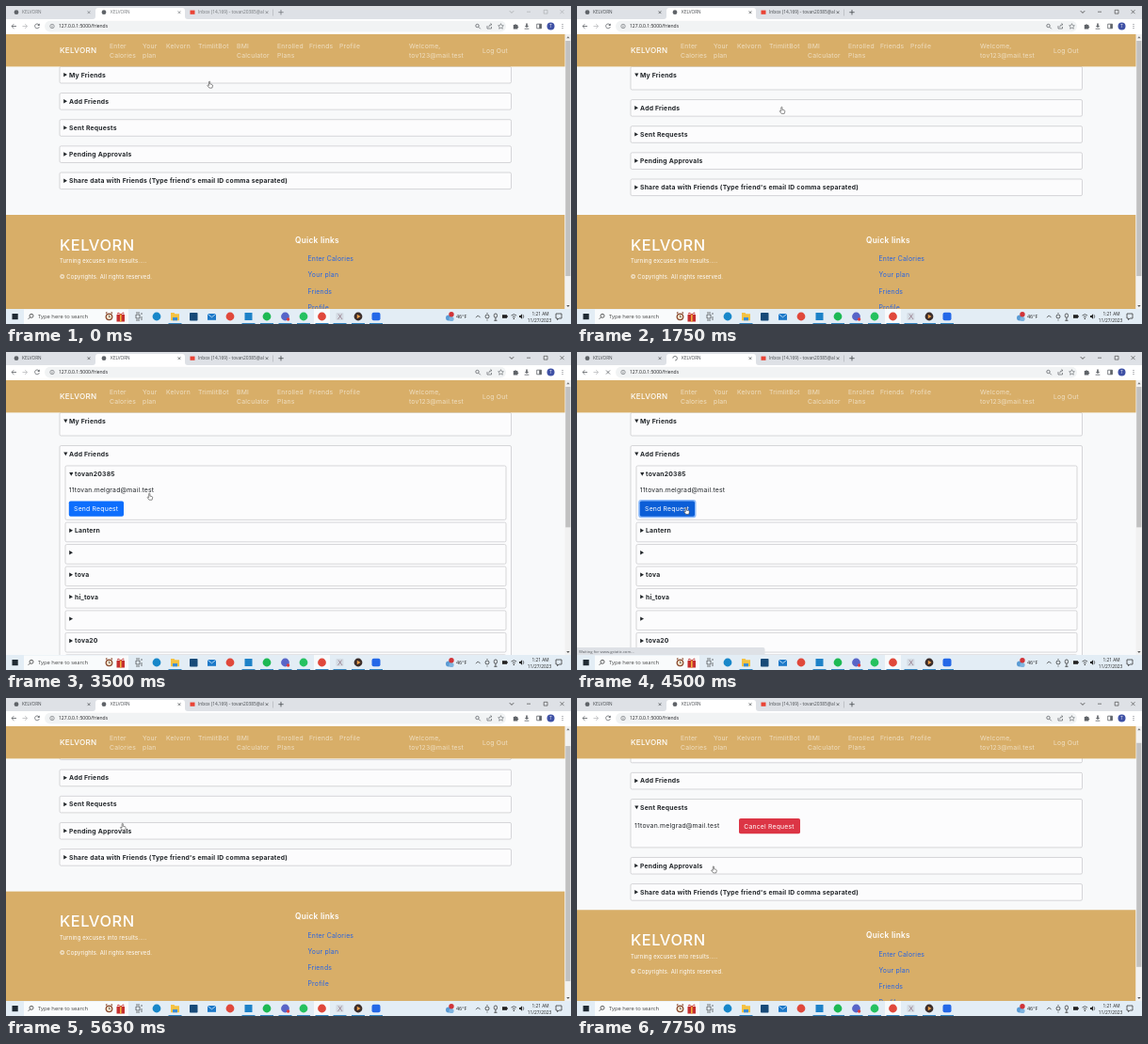
Animation, 600 px wide and 338 px high, one loop 8 s. Source, as an HTML page:

```html
<!DOCTYPE html>
<html lang="en">
<head>
<meta charset="utf-8">
<title>Friends page</title>
<style>
  html, body { margin: 0; width: 100%; height: 100%; overflow: hidden; }
  svg { display: block; width: 600px; height: 338px; }
  text { font-family: "Open Sans", sans-serif; white-space: pre; }
  .web { font-family: Inter, sans-serif; letter-spacing: .032em; }
</style>
</head>
<body>
<svg id="stage" viewBox="0 0 600 338">
  <g id="page"></g>
  <g id="frame"></g>
  <g id="overlay"></g>
  <path id="cursor" fill="#fff" stroke="#333" stroke-width=".55" stroke-linejoin="round"
    d="M-1.2-3.3q.6-.8 1.2 0v2.6l2.2.5q.8.4.6 1.3l-.6 2.3h-3l-2.1-2.7q.2-.8 1.7.1z"/>
</svg>
<script>
const TAN = '#d8ae68', LOOP = 8000, STEP = 125;
const ROW = 17.6, GAP = 10.55, TOP = 64.4;
const BRAND = 'KELVORN', EMAIL = '11tovan.melgrad@mail.test';
const USERS = ['tovan20385', 'Lantern', '', 'tova', 'hi_tova', '', 'tova20', 'tov'];
const $ = id => document.getElementById(id);

// Drawing helpers; text is placed by the middle of its capitals.
const text = (x, mid, str, size, fill, attrs = '') =>
  `<text x="${x}" y="${mid + size * .36}" font-size="${size}" fill="${fill}" ${attrs}>${str}</text>`;
const web = (x, mid, str, fill = '#212529', size = 6.8, weight = 400) =>
  text(x, mid, str, size, fill, `class="web" font-weight="${weight}"`);
const rect = (x, y, w, h, fill, attrs = '') =>
  `<rect x="${x}" y="${y}" width="${w}" height="${h}" fill="${fill}" ${attrs}/>`;
const disc = (x, y, r, fill, attrs = '') =>
  `<circle cx="${x}" cy="${y}" r="${r}" fill="${fill}" ${attrs}/>`;
const ring = (x, y, r, color, w = .8) => disc(x, y, r, 'none', `stroke="${color}" stroke-width="${w}"`);
const line = (d, color = '#5f6368', w = .8) =>
  `<path d="${d}" fill="none" stroke="${color}" stroke-width="${w}"/>`;
const shape = (d, fill) => `<path d="${d}" fill="${fill}"/>`;
const cross = (x, y, r, color, w = .7) =>
  line(`M${x - r} ${y - r}l${2 * r} ${2 * r}m0 ${-2 * r}l${-2 * r} ${2 * r}`, color, w);

// The window's title strip is paler while the window has no focus.
function drawTabs(focused, loading) {
  const ink = focused ? '#45494d' : '#73777b', controls = focused ? '#333' : '#a3a6a9';
  let s = rect(0, 0, 600, 14, '#dee1e6') +
    shape('M92 14q3 0 3-3v-6q0-3 3-3h89q3 0 3 3v6q0 3 3 3z', '#fff');
  s += disc(11, 6.7, 2.4, '#5f6368') + (loading
    ? line('M101.8 6.7a2.3 2.3 0 1 1 2.3 2.3', '#5f6368', .8)
    : disc(104, 6.7, 2.4, '#5f6368'));
  s += text(17, 6.7, BRAND, 4.7, ink) + text(111, 6.7, BRAND, 4.7, ink);
  s += rect(195.5, 4.6, 5, 4.2, '#ea4335') +
    text(204, 6.7, 'Inbox (14,169) - tovan20385@al', 4.8, ink, 'clip-path="url(#tab)"') +
    '<clipPath id="tab"><path d="M204 0h70v14h-70z"/></clipPath>';
  for (const x of [88, 184, 277]) s += cross(x, 6.7, 1.4, ink);
  s += line('M283.5 3.5v7', '#a0a5aa', .5) + line('M289.3 6.7h5.4m-2.7-2.7v5.4', ink);
  s += line('M534.8 5.2l2.2 2.2l2.2-2.2', controls) + line('M553 6.2h4', controls, .6) +
    line('M571.2 4.3h3.8v3.8h-3.8z', controls, .6) + cross(590.5, 6.2, 2, controls, .6);
  return s;
}

function drawToolbar() {
  let s = rect(0, 14, 600, 16, '#fff') + rect(41, 15.8, 490, 11.6, '#f1f3f4', 'rx="5.8"');
  s += line('M11 21.5h-5m2.4-2.4l-2.4 2.4l2.4 2.4') +
    line('M17.5 21.5h5m-2.4-2.4l2.4 2.4l-2.4 2.4', '#babcbe');
  s += ring(49, 21.5, 2.2, '#5f6368', .6) + line('M49 21v1.8m0-2.8v.5', '#5f6368', .6) +
    text(56, 21.5, '127.0.0.1:5000/friends', 5, '#202124');
  s += ring(500.5, 21, 1.7, '#5f6368') + line('M501.8 22.3l2 2');
  s += line('M511 21v3h4.5v-2m-2.8 .6q0-3 3-3m-1.2-1.2l1.4 1.2l-1.4 1.2', '#5f6368', .7);
  s += line('M525.5 18.7l.9 1.9l2 .2l-1.5 1.4l.4 2l-1.8-1l-1.8 1l.4-2l-1.5-1.4l2-.2z', '#5f6368', .6);
  s += shape('M538.8 20h1.5q.7-2 1.5 0h1.6v1.6q2 .8 0 1.6v1.4h-4.6z', '#5f6368');
  s += shape('M552.2 18.5h1.6v2.4h1.4l-2.2 2.2l-2.2-2.2h1.4z', '#5f6368') + line('M550.6 24.2h4.8');
  s += line('M563.7 19.2h4.8v4.6h-4.8z') + rect(566.2, 19.2, 2.3, 4.6, '#5f6368');
  s += disc(578.5, 21.5, 4, '#3f51a5') + text(578.5, 21.5, 'T', 4.4, '#fff', 'text-anchor="middle"');
  for (const dy of [-2, 0, 2]) s += disc(591, 21.5 + dy, .55, '#5f6368');
  return s;
}

function drawNav() {
  const faint = '#efdfc3';
  const links = [[110, 'Enter', 'Calories'], [145, 'Your', 'plan'], [170, 'Kelvorn'], [204, 'TrimlitBot'],
    [245, 'BMI', 'Calculator'], [288, 'Enrolled', 'Plans'], [322, 'Friends'], [354, 'Profile'],
    [428, 'Welcome,', 'tov123@mail.test']];
  let s = rect(0, 30, 593.5, 34.4, TAN) + web(57, 47.2, BRAND, '#fff', 8.1, 500) + web(506, 47.2, 'Log Out', faint);
  for (const [x, ...rows] of links)
    rows.forEach((row, i) => s += web(x, 42.2 + i * 10.2, row, faint));
  return s;
}

function drawTaskbar() {
  let s = rect(0, 322, 600, 16, '#e3edf5') + rect(6.5, 327, 6.2, 6.2, '#1f2a33');
  s += rect(19, 322.5, 111, 15.5, '#f9fbfc') + ring(27, 329.3, 2, '#222', .7) + line('M25.6 330.8l-2 2', '#222', .7) +
    text(34, 330, 'Type here to search', 5.8, '#444');
  s += disc(109.5, 330.3, 3.9, '#8b4a2f') + disc(109.5, 330.3, 2.6, '#f5e6cf') +
    line('M109.5 328.5v2h1.4', '#333', .6) + line('M106 326.5l1.4-1m4.2 0l1.4 1', '#8b4a2f', 1.2);
  s += rect(117.5, 328, 8.5, 7.5, '#c62f2f') + rect(121, 327, 1.6, 8.5, '#f0b23c') +
    line('M121.8 328q-4-3.5-3-.5m3 .5q4-3.5 3-.5', '#c62f2f', 1);
  s += line('M138 328h4v4h-4zm0-2h4m-4 8h4m2-8v2m0 2v4', '#222', .6);
  s += rect(327, 322, 17, 16, '#f7fafc');
  s += disc(160, 330, 4.4, '#1787c9');
  s += shape('M175 326h3.5l1 1.3h4.5v7h-9z', '#f5c242') + rect(177, 331, 5, 3.3, '#3d8fd6');
  s += rect(195, 326, 8.5, 8.5, '#174a78', 'rx=".8"');
  s += rect(214, 327, 9, 6.8, '#1b78c8') + line('M214 327.2l4.5 3.6l4.5-3.6', '#d9efff', .8);
  const apps = [[238, '#e0483b'], [277, '#1db954'], [296.5, '#5865c8'], [316, '#25c160'], [335.5, '#e0483b'], [374, '#3b2d2a']];
  for (const [x, fill] of apps) s += disc(x, 330, 4.4, fill);
  s += rect(253.5, 326, 8, 8, '#1e82c8') + rect(388.5, 325.8, 9, 8.4, '#2468e8', 'rx="2"');
  s += rect(350.5, 326, 8, 8, '#d4dce4', 'rx="1"') + line('M352.5 333l4-5.5m-3.5 0l4 5.5', '#8d6f80', .7) +
    shape('M372.8 327.8l3.8 2.2l-3.8 2.2z', '#f3a04a') + disc(299.6, 333, 1.7, '#e03c3c');
  for (const x of [179.5, 257.5, 277, 296.5, 316, 335.5, 354.5, 374, 393])
    s += rect(x - 7, 337, 14, 1, '#3383bd');
  s += disc(470, 331.5, 3, '#5a9bd4') + disc(473, 332.5, 2.6, '#7fb4df') + disc(473, 327.7, 2.7, '#d13438') +
    text(478, 330, '46°F', 5.4, '#222');
  s += line('M499 331.2l2.3-2.3l2.3 2.3', '#222', .7) + ring(511, 330, 2, '#222', .7) + line('M511 327v-1m0 7.5v1', '#222', .7);
  s += rect(518.3, 327, 3.2, 4.2, 'none', 'rx="1.5" stroke="#222" stroke-width=".7"') + line('M519.9 331.3v3m-1.6 0h3.2', '#222', .7);
  s += rect(527, 328.2, 5, 3.6, '#222') + rect(532, 329.2, .8, 1.6, '#222');
  s += line('M536.5 329q2.8-2.6 5.6 0m-4.3 1.6q1.5-1.4 3 0', '#222', .7) + disc(539.3, 332.3, .7, '#222');
  s += shape('M545 329h1.3l1.8-1.8v5.6l-1.8-1.8h-1.3z', '#222') + line('M549.2 328.2q1.3 1.8 0 3.6', '#222', .6);
  s += text(567.5, 326.8, '1:21 AM', 4.8, '#222', 'text-anchor="middle"') +
    text(566.5, 333.8, '11/27/2023', 4.8, '#222', 'text-anchor="middle"');
  s += line('M584 327h6v5h-3l-1.4 1.6v-1.6h-1.6z', '#222', .7);
  return s;
}

function panel(x, y, w, h, title, open) {
  const mid = y + 8.7, left = x + 4.2;
  const arrow = open ? `M${left} ${mid - 1.7}h4.2l-2.1 3.8z` : `M${left} ${mid - 2.2}l3.8 2.2l-3.8 2.2z`;
  return rect(x, y, w, h, '#fcfcfd', 'rx="1.5" stroke="#bdbdc0" stroke-width=".6"') +
    shape(arrow, '#212529') + web(x + 10, mid, title, '#212529', 6.8, 700);
}

function button(x, y, w, label, fill) {
  return rect(x, y, w, 16.4, fill, 'rx="1.8"') + web(x + 5.3, y + 8.2, label, '#fff');
}

function userList(top, state) {
  let s = '', y = top + 21.4;
  USERS.forEach((name, i) => {
    const open = i === 0 && state.user, h = open ? 57.4 : 20.7;
    s += panel(63, y, 468, h, name, open);
    if (open) {
      s += web(66.7, y + 25.5, EMAIL);
      if (state.clicked) s += rect(65.2, y + 36, 61.3, 19.4, '#8dbbfb', 'rx="3"');
      s += button(66.8, y + 37.5, 58.2, 'Send Request', state.clicked ? '#0b5ed7' : '#0d6efd');
    }
    y += h + 2.75;
  });
  return s;
}

function drawPage(state, scroll) {
  const sections = [
    ['My Friends', state.friends && 24.6],
    ['Add Friends', state.add && (state.user ? 248.3 : 211.6), y => userList(y, state)],
    ['Sent Requests', state.sent && 51.4,
      y => web(61, y + 28.4, EMAIL) + button(172, y + 20.4, 65, 'Cancel Request', '#dc3545')],
    ['Pending Approvals'],
    ["Share data with Friends (Type friend's email ID comma separated)"],
  ];
  let s = '', y = TOP;
  for (const [title, openHeight, body] of sections) {
    const h = openHeight || ROW;
    s += panel(57, y, 479.5, h, title, openHeight);
    if (openHeight && body) s += body(y);
    y += h + GAP;
  }
  const foot = Math.max(222, y - .5);
  s += rect(0, foot, 593.5, 130, TAN) + web(57, foot + 32, BRAND, '#fff', 16.4, 500) +
    web(57, foot + 49.3, 'Turning excuses into results.....', '#fff', 5.9) +
    web(57, foot + 65.5, '© Copyrights. All rights reserved.', '#fff', 5.8) +
    web(307, foot + 26.6, 'Quick links', '#fff', 8.3, 600);
  ['Enter Calories', 'Your plan', 'Friends', 'Profile'].forEach((label, i) =>
    s += web(320.5, foot + 46.8 + i * 17.2, label, '#2463e6', 6.9));

  const k = 280 / (foot + 105);
  return rect(0, 30, 600, 292, '#f8f9fa') + `<g transform="translate(0 ${-scroll})">${s}</g>` +
    rect(593.5, 30, 6.5, 292, '#f1f1f1') + rect(594.2, 37 + scroll * k, 5.2, 292 * k, '#c1c1c1') +
    shape('M595.2 34.2l1.7-2l1.7 2z', '#777') + shape('M595.2 318l1.7 2l1.7-2z', '#555');
}

function drawOverlay(focused, loading, status) {
  let s = drawTabs(focused, loading) + (loading
    ? cross(33, 21.5, 2, '#5f6368', .8)
    : line('M35 20a2.4 2.4 0 1 0 .3 2.2') + shape('M35.7 18.6v2.4h-2.4z', '#5f6368'));
  if (status) s += shape('M0 314h197.500q2 0 2 2v6h-199.500z', '#dee1e6') +
    text(2, 318.2, 'Waiting for www.gstatic.com...', 4.2, '#5a5e63');
  return s;
}

// Keyframes are [time, ...values], joined by straight lines.
const cursorKeys = [[0, 216.7, 83.7], [125, 223.5, 83], [750, 223.5, 83], [1250, 218, 111], [2000, 218, 111],
  [2375, 209, 125], [2625, 207.5, 131], [3125, 207.5, 131], [3750, 116.5, 169], [4875, 116.5, 169],
  [5250, 122.5, 147], [5500, 122.5, 147], [5875, 128, 117], [6500, 128, 117], [7250, 144, 181],
  [7625, 144, 181], [7750, 145.5, 182.5]];
const scrollKeys = [[0, 0], [4625, 0], [4875, 15.2], [5125, 16.4], [6375, 16.4], [7000, 13.2]];

function at(keys, t) {
  const i = keys.findIndex(key => key[0] > t);
  if (i < 0) return keys[keys.length - 1].slice(1);
  const [a, b] = [keys[i - 1], keys[i]], p = (t - a[0]) / (b[0] - a[0]);
  return a.slice(1).map((v, n) => v + (b[n + 1] - v) * p);
}

let shown = -1;
function render(now) {
  const t = Math.floor((now % LOOP) / STEP) * STEP;
  if (t !== shown) {
    shown = t;
    const during = (from, to) => t >= from && t < to;
    const state = {
      friends: during(625, 4625), add: during(1875, 4625), user: during(3125, 4625),
      clicked: during(4250, 4625), sent: t >= 5875,
    };
    $('page').innerHTML = drawPage(state, at(scrollKeys, t)[0]);
    $('overlay').innerHTML = drawOverlay(t >= 375, state.clicked, during(4375, 5125));
    $('cursor').setAttribute('transform', `translate(${at(cursorKeys, t)})`);
  }
  requestAnimationFrame(() => render(performance.now() - start));
}

$('frame').innerHTML = drawToolbar() + drawNav() + drawTaskbar();
const start = performance.now();
render(0);
</script>
</body>
</html>
```
